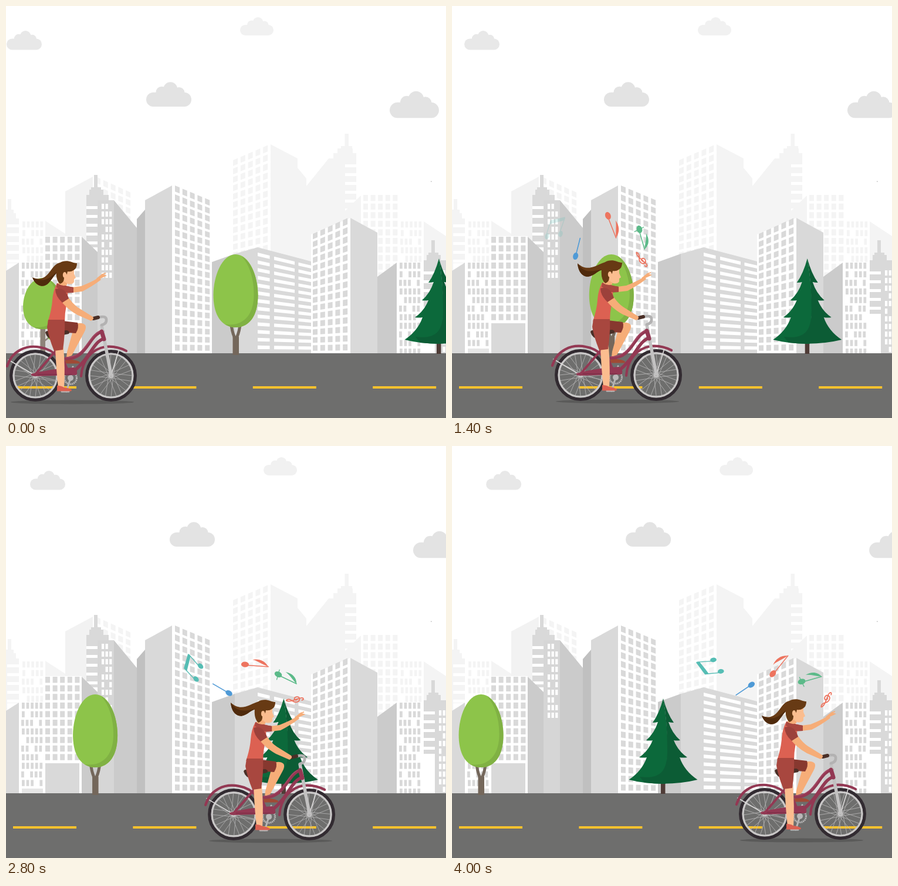
An HTML page that plays this animation: 750 px wide and 700 px high, repeating every 4.07 s.

```html
<!DOCTYPE html>
<html lang="en">
<head>
<meta charset="utf-8">
<title>City ride</title>
<style>
html, body { margin: 0; width: 100%; height: 100%; overflow: hidden; background: #fff; }
svg { display: block; width: 750px; height: 700px; }
</style>
</head>
<body>
<svg id="stage" viewBox="0 0 750 700"></svg>
<script>
const LOOP = 4070, FPS = 15;
const FAR = '#f4f4f4', MID = '#d9d9d9', SIDE = '#cbcbcb';
const SKIN = '#fbbd8f', SKIN2 = '#f6ad78', RED = '#dc6152', DARK = '#a8473f', DEEP = '#87382f';
const PLUM = '#933853', STEEL = '#b9b8b8', HAIR = '#673a14', HAIR2 = '#4f2a0c';

const fill = (d, c) => `<path d="${d}" fill="${c}"/>`;
const line = (d, c, w) => `<path d="${d}" fill="none" stroke="${c}" stroke-width="${w}" stroke-linecap="round" stroke-linejoin="round"/>`;
const rect = (x, y, w, h, c) => `<rect x="${x}" y="${y}" width="${w}" height="${h}" fill="${c}"/>`;
const oval = (x, y, rx, ry, c) => `<ellipse cx="${x}" cy="${y}" rx="${rx}" ry="${ry}" fill="${c}"/>`;
const group = (id, s) => `<g id="${id}">${s}</g>`;
const poly = (pts, c) => fill('M' + pts + 'Z', c);

// Five columns of windows whose rows flatten towards the street line.
function slanted(x0, top, slope, rows, c, end = 590) {
  let d = '';
  const at = (x, k) => { const t = top + slope * (x - x0); return t + k * (590 - t) / rows; };
  for (let i = 0; i < 5; i++) {
    const x = x0 + i * 12.8, r = x + 8;
    for (let k = 0; k < rows && at(x, k) < end; k++)
      d += `M${x},${at(x, k)}L${r},${at(r, k)}V${at(r, k + .69)}L${x},${at(x, k + .69)}Z`;
  }
  return fill(d, c);
}
function flat(x0, y0, y1, c) {
  let s = '';
  for (let y = y0; y < y1; y += 14.6)
    for (let i = 0; i < 5; i++) s += rect(x0 + i * 12.6, y, 8, 10.4, c);
  return s;
}
function narrow(x0, y0, y1, c) {
  let s = '';
  for (let y = y0, k = 0; y < y1; y += 14.6, k++)
    for (let i = 0; i < 5; i++)
      if ((k * 3 + i * 2) % 7 !== 5) s += rect(x0 + i * 7.6 - (k % 3 === 2 ? 1 : 0), y, 4.8, 10.4, c);
  return s;
}
function bars(x, w, y0, y1, c) {
  let s = '';
  for (let y = y0; y < y1; y += 15) s += rect(x, y, w, Math.min(10, y1 - y), c);
  return s;
}
const spire = (x, y, c) => rect(x - 3, y, 6, 24, c) + rect(x - 8, y + 21, 17, 6, c) +
  rect(x - 11, y + 25, 24, 9, c) + rect(x - 16, y + 34, 38, 9, c);
function lights(x, y0, y1, cols) {
  let s = '';
  for (let y = y0, k = 0; y < y1; y += 13, k++)
    for (let i = 0; i < cols; i++)
      if ((k * 2 + i * 3) % 7 !== 6) s += rect(x + i * 6.6, y, 4.2, 9, '#fff');
  return s;
}

function city() {
  let s = '';
  // Far skyline
  s += rect(3, 328, 6, 20, FAR) + rect(0, 346, 13, 7, FAR) + rect(0, 352, 17, 10, FAR) + bars(0, 22, 361, 437, FAR);
  s += rect(0, 361, 2, 90, FAR) + narrow(28, 366, 436, FAR) + poly('67,365 101,387 130,387 130,400 67,400', FAR);
  s += poly('101,315 148,290 148,420 101,420', '#f2f2f2') + slanted(153, 290, .45, 20, FAR, 400);
  s += slanted(387, 262, -.43, 23, FAR, 440);
  s += poly('451,235 497,259 497,275 512,293 512,306 550,259 578,259 578,440 451,440', FAR);
  s += rect(577.5, 217, 6.5, 24, FAR) + rect(571, 238, 19, 6, FAR) + rect(565, 242, 26, 9, FAR) + rect(558, 250, 39, 9, FAR);
  s += bars(578, 19, 259, 350, FAR) + poly('577,349 605,322 605,400 577,400', FAR);
  s += flat(609, 321, 455, FAR) + narrow(673, 366, 436, FAR) + poly('712,366 750,391 750,440 712,440', FAR);

  // Near skyline
  s += poly('0,450 22,436 22,590 0,590', MID) + rect(22, 436, 45, 154, '#fff') + narrow(27, 436, 580, MID) + rect(27, 582, 36, 8, '#e6e6e6');
  s += rect(66, 391, 63, 199, '#fff');
  s += rect(137, 330, 19, 80, '#fff') + bars(137, 19, 330, 410, MID) + spire(153, 287, MID);
  s += poly('156,330 184,330 184,590 156,590', '#d6d6d6') + lights(163, 336, 460, 3);
  s += flat(67, 392, 530, MID) + rect(67, 539, 58, 51, MID) + poly('129,392 156,418 156,590 129,590', SIDE);
  s += poly('184,330 223,377 223,590 184,590', SIDE) + poly('223,362 237,346 237,590 223,590', '#c0c0c0');
  s += poly('237,330 283,305 283,590 237,590', MID);
  s += poly('283,305 351,332 351,590 283,590', '#fff') + slanted(288, 305, .42, 19, MID);
  s += poly('351,435 390,421 390,590 351,590', SIDE) + poly('390,421 429,410 429,590 390,590', MID);
  s += poly('429,410 520,434 520,590 429,590', MID);
  const roof = x => 419 + (x - 429) * .24;
  for (const [a, b] of [[429, 449.5], [457, 492], [498.5, 520]]) {
    for (let k = 0; k < 13; k++) {
      const y = (x, j) => roof(x) + j * (590 - roof(x)) / 13;
      s += poly(`${a},${y(a, k)} ${b},${y(b, k)} ${b},${y(b, k + .46)} ${a},${y(a, k + .46)}`, '#fff');
    }
  }
  s += poly('520,388 587,360 587,590 520,590', '#fff') + slanted(523, 387, -.45, 15, MID);
  s += poly('587,360 633,385 633,590 587,590', MID) + poly('633,460 666,436 666,590 633,590', SIDE);
  s += rect(666, 436, 46, 154, '#fff') + narrow(671, 436, 586, MID);
  s += rect(712, 441, 38, 149, '#fff') + spire(728, 398, MID) + bars(712, 20, 441, 523, MID);
  s += rect(731, 441, 19, 149, MID) + lights(738, 449, 580, 2);
  s += rect(724, 297.5, 1.6, 1.4, '#bbb');
  return s;
}

function cloud(x, y, w, c) {
  const k = w / 84;
  return `<g transform="translate(${x} ${y}) scale(${k})" fill="${c}"><rect y="19" width="84" height="26.5" rx="13.2"/>
    <circle cx="45" cy="13" r="13"/><circle cx="29" cy="19" r="11"/><circle cx="61" cy="20" r="10.5"/><rect x="24" y="17" width="40" height="17"/></g>`;
}

const egg = 'M0,422C24,422 38,460 38,491C38,527 23,546 0,546C-23,546 -38,527 -38,491C-38,460 -24,422 0,422Z';
const eggShade = 'M10,425C29,436 38,465 38,491C38,527 23,546 0,546C-7,546 -13,544 -18,541C14,545 31,524 31,490C31,464 24,440 10,425Z';
const roundTree = line('M-7,545Q-5,558 0,567Q5,558 7,545', '#74675b', 5) + rect(-5, 562, 10.5, 31, '#74675b') +
  fill(egg, '#8dc44a') + fill(eggShade, '#80b143');
const smallTree = line('M2,570L12,562', '#8d8378', 2.5) + rect(-4, 540, 8.5, 50, '#8d8378') + oval(15, 561, 7, 6.5, '#8dc44a') +
  `<g transform="translate(0 166) scale(.88 .7016)">${fill(egg, '#8dc44a') + fill(eggShade, '#80b143')}</g>`;
// One side of the pine: control and end points down the branches.
const half = s => 'M0,429' + [[7, 455, 18, 470], [13, 470, 9, 469], [15, 488, 29, 500], [23, 501, 18, 500],
  [25, 518, 41, 529], [34, 530, 28, 529], [36, 552, 58.5, 567]]
  .map(p => `Q${s * p[0]},${p[1]} ${s * p[2]},${p[3]}`).join('');
const pine = rect(-4, 570, 7.5, 21, '#4f3c37') + fill(half(-1) + 'Q-28,574.5 4,574L8,515Q7,470 0,429Z', '#0c693b') +
  fill(half(1) + 'Q18,577 -32,572L-40,562C-8,566 8,556 7,515Q7,470 0,429Z', '#0c5c35');

function wheel(id, x) {
  let d = '';
  for (let i = 0; i < 24; i++) {
    const a = i * Math.PI / 12, b = a + (i % 2 ? 1.3 : -1.3);
    d += `M${4 * Math.cos(b)},${4 * Math.sin(b)}L${37 * Math.cos(a)},${37 * Math.sin(a)}`;
  }
  return `<g transform="translate(${x} 628)"><g id="${id}">${line(d, '#b5b4b4', .8)}</g>
    <circle r="41.3" fill="none" stroke="#322b31" stroke-width="5.4"/><circle r="37" fill="none" stroke="#c9c7c7" stroke-width="3.2"/>
    <circle r="4" fill="#c4c3c3"/><circle r="1.6" fill="#8c8b8b"/></g>`;
}

const shoe = (x, y, c) => fill(`M${x},${y}q7,0 12,3q9,1 13,4q0,3 -4,2.5h-21z`, c);
const farLegs =
  group('farA', shoe(101, 598, '#a04a35') + fill('M117,541Q128,536 135,542Q138,546 133,555L112,594L103,597L104,588Z', SKIN2) +
    fill('M88,534L122,538Q125,546 119,556L90,554Z', DEEP)) +
  group('farB', fill('M89,574L102,574Q103,606 97,643L91,643Z', SKIN2) + shoe(91, 641, RED) + fill('M84,556L103,556L101,578L88,576Z', DEEP));
const nearLegs =
  group('nearA', fill('M84,580L98,580Q101,614 99,650L89,650Q85,612 84,580Z', SKIN) + shoe(87, 645, RED) +
    fill('M72,533L100,533Q101,556 97,584L82,586Q73,564 70,546Z', DARK)) +
  group('nearB', fill('M115,546Q129,541 136,549Q137,554 131,562L114,594L103,598L102,592Z', SKIN2) + shoe(100, 597, DARK) +
    fill('M72,533L98,535L122,542Q124,551 117,561L76,559Q70,553 70,546Z', DARK));

function bicycle() {
  let s = wheel('rear', 50) + wheel('front', 179);
  s += line('M50,628L4,601M179,628L193,583', '#dcdada', 1.6);
  s += line('M2,612C10,586 34,575 59,580Q77,583 89,597', PLUM, 4.2) + line('M128,629C130,602 146,583 169,579Q188,577 205,586', PLUM, 4.2);
  s += `<g id="crank">${line('M0,0L-7,23', STEEL, 3)}${line('M0,0L4,-19', STEEL, 3)}</g>`;
  s += `<circle cx="110" cy="632" r="10.5" fill="none" stroke="${STEEL}" stroke-width="3" stroke-dasharray="2 1"/>` + oval(110, 632, 5, 5, STEEL);
  s += line('M50,628L108,641', '#a9a8a8', 1.2) + line('M95,655H107', STEEL, 3);
  s += line('M82,565L87,578', STEEL, 4) + line('M86,576L106,622', PLUM, 5) + line('M50,626L88,582', PLUM, 4);
  s += line('M165,553C141,557 139,600 102,599', PLUM, 5.5) + line('M167,565C147,572 145,597 114,622', PLUM, 5.5);
  s += line('M165,551C141,555 138,597 102,597', '#a84a68', 1.3);
  s += fill('M43,625Q78,616 116,614Q124,620 120,627L49,629Q42,629 43,625Z', PLUM) + line('M54,626H112', '#752a42', 1);
  s += line('M163,543L179,626', '#c2c1c1', 5.5) + line('M163,553L167,566', PLUM, 7);
  s += line('M158,529Q170,526 171,532Q172,540 163,542', '#b3b2b2', 4.6) + line('M149,531L157,529', '#4a2f27', 6);
  s += fill('M67,555Q68,550 77,553L104,551Q110,553 107,557L88,561L82,567Q70,566 67,555Z', '#4a2f27');
  return s;
}

const farArm = fill('M112,478L128,476Q146,469 159,461L162,465Q146,477 130,485L113,487Z', SKIN2) +
  fill('M154,463L164,455L170,453L170,455L166,456L172,458L161,463L157,468Z', SKIN2) +
  fill('M96,475L115,478L115,487L98,488Z', DEEP);
const torso = fill('M87,471L103,475Q107,486 104,504Q100,520 100,537L71,537Q78,516 79,500Q80,484 87,471Z', RED) +
  fill('M87,471L101,475L115,478L115,487L102,487L86,478Z', DARK);
const nearArm = fill('M96,504L107,496Q116,509 127,515L148,528Q151,532 145,535L122,525Q107,517 96,504Z', SKIN2) +
  fill('M84,481Q92,478 99,483Q105,490 107,497L96,504Q84,493 84,481Z', '#9c413b');
const head = fill('M92,458L105,463L104,474Q97,477 89,472Z', SKIN2) +
  fill('M97,447L116,447L116,455L119,462L116,464L116,469Q113,474 105,472L97,466Z', SKIN) +
  fill('M86,447C87,434 101,431 112,435Q118,437 121,437Q121,446 115,449Q111,452 105,451L104,455L99,462Q99,470 92,472Q84,465 86,447Z', HAIR) +
  oval(100, 457, 3.2, 5, SKIN);

const clef = '<g transform="scale(.8 .95)">' +
  line('M1,4c-3,0 -3,-5 1,-5c5,0 5,9 -1,9c-8,0 -8,-9 -3,-13c5,-4 6,-8 3,-11c-4,3 -3,9 -1,16l2,11c0,5 -5,5 -5,1', '#ed745f', 2.1) + '</g>';
const flagged = (h, c) => line(`M${-h},0H${h}`, c, 1.5) + oval(-h, -1, 6.6, 4.7, c) +
  fill(`M${h},0C13,-10 3,-13 -8,-10C0,-9 7,-4 ${h},0Z`, c);
const green = flagged(17.5, '#5cba89') + line('M-19,-9L-16,8', '#5cba89', 1.3);
const blue = line('M-16.5,0H16.5', '#4f9ad6', 1.6) + oval(-15, 0, 6.2, 4.4, '#4f9ad6');
const pair = fill('M-9,11L-21,-11L-15,-11Q-10,-3 -2,11Z', '#55bdb4') + line('M-8,11L19,12M-19,-11L9,-9', '#55bdb4', 1.4) +
  oval(19, 10, 5.4, 3.8, '#55bdb4') + oval(9, -11, 5.4, 3.8, '#55bdb4');

// Each note: art, first step, step of reference, x, dx, y, dy, angle, turn
const notes = [
  [clef, 0, 7, 154, .02, 431, 0, 0, -2.8],
  [green, 5, 7, 163, -.62, 396.5, 0, 106, -2.3],
  [flagged(20, '#ed745f'), 10, 15, 107.3, -.67, 376, -.09, 87, -3.07],
  [blue, 15, 27, 40.6, -.78, 411, .09, -97, -3.54],
  [pair, 20, 27, -.4, -1.35, 375.5, 0, 88, -2.9]
];

let dashes = '';
for (let i = 0; i < 4; i++) dashes += rect(12 + i * 204.4, 646, 108, 4, '#fcc22d');

const stage = document.getElementById('stage');
stage.innerHTML = group('clouds', cloud(1, 42, 60, '#e8e8e8') + cloud(399, 19, 57, '#f1f1f1') +
    cloud(239, 129.3, 77, '#e3e3e3') + cloud(654, 144.8, 84, '#e3e3e3')) +
  city() + rect(0, 590, 750, 110, '#6e6e6d') + dashes +
  group('small', smallTree) + group('round', roundTree) + group('pine', pine) +
  group('rider', oval(113, 673, 105, 3.4, '#5a5a59') + farLegs + farArm + bicycle() + torso + nearLegs + nearArm +
    '<path id="tail" fill="' + HAIR + '"/><path id="tailShade" fill="' + HAIR2 + '"/>' + head) +
  notes.map((n, i) => group('note' + i, n[0])).join('');

const el = id => document.getElementById(id);
const move = (id, x, y = 0, extra = '') => el(id).setAttribute('transform', `translate(${x} ${y}) ${extra}`);
const show = (id, on) => el(id).setAttribute('visibility', on ? 'visible' : 'hidden');

// u blends the hair from hanging (0) to lifted (1).
function ponytail(u) {
  const p = (x, y, x2, y2) => `${x + (x2 - x) * u},${y + (y2 - y) * u} `;
  const tip = p(45, 462, 45, 432), root = '92,449 ';
  const under = 'C' + p(49, 472, 45, 446) + p(56, 477, 52, 457) + p(64, 476, 63, 457) +
    'C' + p(76, 474, 74, 456) + p(80, 456, 80, 446) + root;
  el('tail').setAttribute('d', 'M93,436 C' + p(75, 437, 78, 441) + p(75, 473, 60, 450) + tip + under + 'Z');
  el('tailShade').setAttribute('d', 'M' + tip + under + 'C' + p(82, 450, 79, 446) + p(74, 476, 56, 458) + tip + 'Z');
}

function draw(now) {
  const n = Math.floor((now % LOOP) * FPS / 1000 + .06);
  const ride = n * 8.05, down = Math.floor(n / 10) % 2 === 0;
  move('clouds', n * .9524);
  move('small', 62.5 - n * 6.15);
  move('round', 391.5 - n * 5.7);
  move('pine', 738 - n * 6.3);
  move('rider', ride, -n * .05);
  for (const id of ['rear', 'front']) el(id).setAttribute('transform', `rotate(${n * 10.7})`);
  move('crank', 110, 632, down ? '' : 'rotate(6)');
  for (const id of ['farA', 'nearA']) show(id, down);
  for (const id of ['farB', 'nearB']) show(id, !down);
  ponytail((1 - Math.cos((n - 1.5) * Math.PI / 15)) / 2);
  notes.forEach(([, start, ref, x, dx, y, dy, angle, turn], i) => {
    const k = n - ref;
    move('note' + i, ride + x + dx * k, y + dy * k, `rotate(${angle + turn * k})`);
    el('note' + i).setAttribute('opacity', Math.max(0, Math.min(1, (n - start) / 5)));
  });
}

const begin = performance.now();
(function tick() {
  draw(performance.now() - begin);
  requestAnimationFrame(tick);
})();
</script>
</body>
</html>
```
